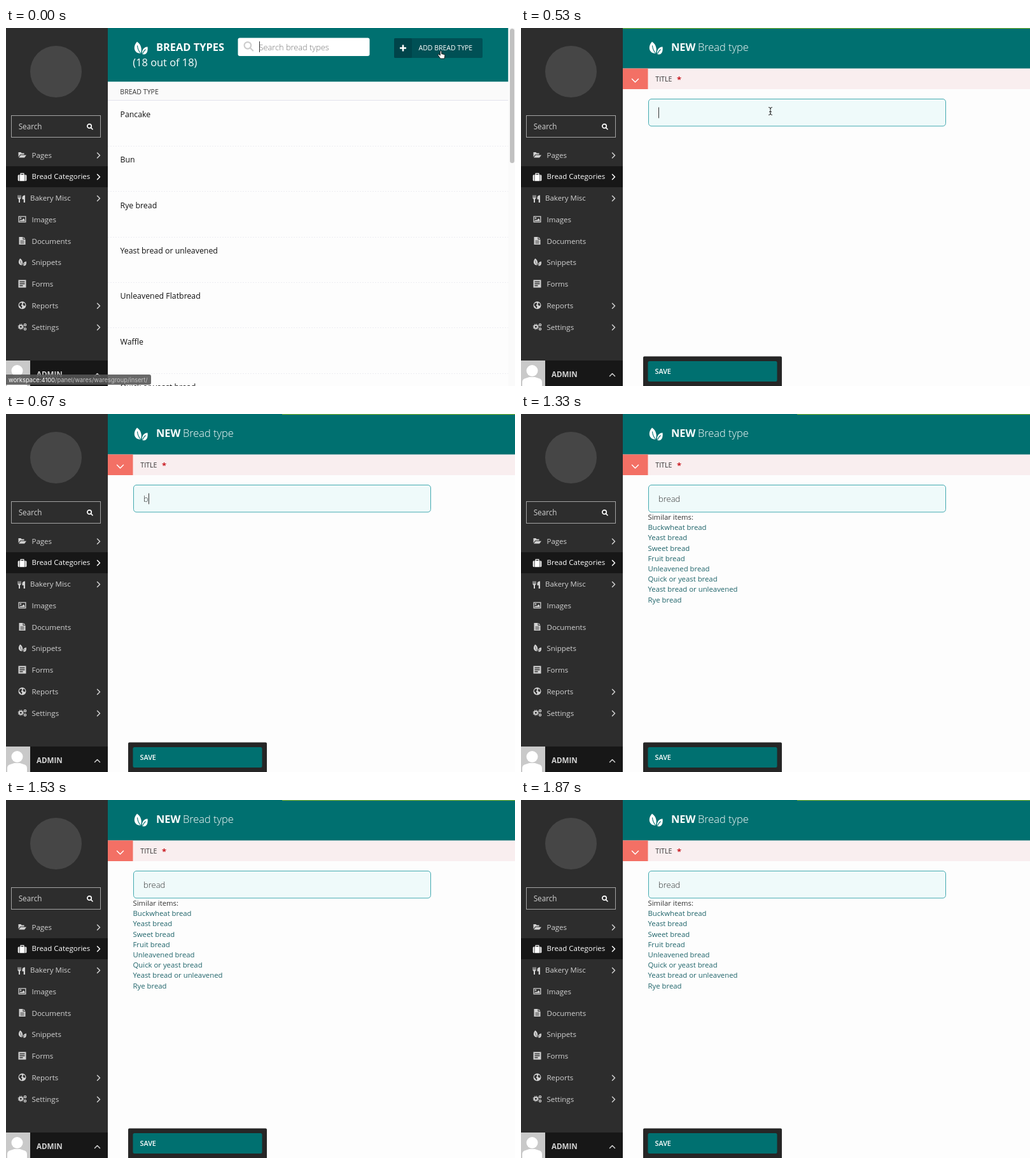
An HTML page that plays this animation: 800x562 px, repeating every 2.01 s.

```html
<!DOCTYPE html>
<html lang="en">
<head>
<meta charset="utf-8">
<title>Bread types</title>
<style>
html, body { margin: 0; width: 100%; height: 100%; overflow: hidden; background: #fdfdfd; }
svg { display: block; width: 800px; height: 562px; }
text { font-family: "Open Sans", sans-serif; white-space: pre; }
.light { font-weight: 300; }
.medium { font-weight: 500; }
.semi { font-weight: 600; }
.bold { font-weight: 700; }
.line { fill: none; stroke-width: 1.5; stroke-linecap: round; stroke-linejoin: round; }
.status { font-family: Inter, sans-serif; font-size: 9.4px; }
</style>
</head>
<body>
<svg viewBox="0 0 800 562">
  <defs>
    <g id="leaf">
      <path d="M4 0C0 4-2 11 2 15.500c2 2.500 5 3 8 2.500C12 11 10 4 4 0Z"/>
      <path d="M20.500 8c-6 .5-9.500 5-8.500 11.500 7 2 9.500-4 8.500-11.500Z"/>
      <path d="M4.500 6q.5 7 5 12M17.500 12q-3.500 3-5 7" fill="none" stroke="currentColor" stroke-width="1.100"/>
    </g>
    <g id="lens" fill="none" stroke="currentColor">
      <circle r="3.200" cx="-1" cy="-1"/><path d="M1.500 1.500 4 4" stroke-linecap="round"/>
    </g>
    <g id="Pages"><path d="M-6-4h4l1 1.500h4v2h-6l-3 4Z"/><path d="M-2.500.5h9l-3 4h-9Z"/></g>
    <g id="Bread"><path d="M-3-2v-3h6v3h-1.200v-1.800h-3.600V-2Z"/><path d="M-4-2.500h8v10h-8ZM-4.800-2.500v10q-2 0-2-1.500v-7q0-1.500 2-1.500ZM4.800-2.500v10q2 0 2-1.500v-7q0-1.500-2-1.500Z"/></g>
    <g id="Bakery"><path d="M-7-4h1v4h1v-4h1v4h1v-4h1v5l-1.500 1.500v5h-2v-5L-7 1ZM4.500-4v11.500h-2.300v-5H0V-1q1-3 4.500-3Z"/></g>
    <g id="Images"><path d="M-6-5H6V5H-6ZM-4.700-3.700v7.400h9.400v-7.400Z" fill-rule="evenodd"/><circle cx="-2.500" cy="-1.700" r="1.200"/><path d="M-4 3v-1l2-1.500 1.500 1 2.500-3 2 2.500v2Z"/></g>
    <g id="Documents"><path d="M-5-6H1v4h4v8H-5ZM2-6l3 3H2Z"/><path d="M-3 0h6M-3 2h6M-3 4h6" stroke="#2d2d2d" stroke-width=".8"/></g>
    <g id="Snippets"><use href="#leaf" transform="translate(-5.500 -6) scale(.58)" color="#2d2d2d"/></g>
    <g id="Forms"><path d="M-6-6H6V6H-6Z"/><path d="M-4-3h8M-4 0h8M-4 3h5" stroke="#2d2d2d" stroke-width="1.300"/></g>
    <g id="Reports"><circle r="6"/><path d="M-4-3l3-1 1 2-2 2 2 2-1 3-2-3-2-2ZM2-4l2 1 1 3-2 1-2-2Z" fill="#2d2d2d"/></g>
    <g id="Settings" fill="none" stroke="currentColor">
      <circle cx="-2.200" r="2.600" stroke-width="2"/><circle cx="-2.200" r="4.200" stroke-dasharray="1.700 1.600"/>
      <circle cx="4.500" cy="-3" r="1.600" stroke-width="1.400"/><circle cx="4.500" cy="3.500" r="1.600" stroke-width="1.400"/>
    </g>
  </defs>

  <rect width="800" height="562" fill="#fdfdfd"/>

  <g id="listing">
    <rect x="160" width="629.500" height="84.500" fill="#007070"/>
    <use href="#leaf" x="202" y="21.500" fill="#fff" color="#007070"/>
    <g fill="#fff" font-size="16.400">
      <text class="bold" x="236" y="36">BREAD TYPES</text>
      <text x="199.300" y="60.300">(18 out of 18)</text>
    </g>
    <rect x="364.500" y="15.500" width="207" height="28.500" rx="3" fill="#fff"/>
    <use href="#lens" transform="translate(381.500 29) scale(1.650)" color="#ccc" stroke-width="1.300"/>
    <text class="light" x="397.500" y="34.500" font-size="12.800" fill="#777">Search bread types</text>
    <path d="M398.500 21v17" stroke="#333"/>
    <rect x="610" y="16" width="139" height="31" rx="2" fill="#005055"/>
    <rect x="610" y="16" width="28" height="31" rx="2" fill="#00444a"/>
    <path d="M619 31.500h10M624 26.500v10" stroke="#fff" stroke-width="2.600"/>
    <text class="medium" x="648.500" y="35.200" font-size="10.500" fill="#fff">ADD BREAD TYPE</text>
    <rect x="160" y="84.500" width="629.500" height="29" fill="#fafafa"/>
    <path d="M160 113.500h629.500" stroke="#e3e3ec"/>
    <text x="179.300" y="103.500" font-size="10.600" fill="#333">BREAD TYPE</text>
    <g id="rows" font-size="12.350" fill="#111"></g>
    <rect x="789.500" width="10.500" height="562" fill="#fafafa"/>
    <rect x="792" y="1" width="7" height="211" rx="3.500" fill="#c1c1c1"/>
    <path d="M682.700 48l-3.700-5.500q-.3-1.800 1.600-1l1.700 1.500v-6q1.200-1.800 2.300 0v3.500l4.200 1q1.200.4 1 2l-.8 4.500Z" fill="#fff" stroke="#111" stroke-width=".9"/>
  </g>

  <g id="editor">
    <rect x="160" width="640" height="64" fill="#007070"/>
    <path id="edge" stroke="#7fb52a"/>
    <use href="#leaf" x="202" y="21.500" fill="#fff" color="#007070"/>
    <g fill="#fff" font-size="16.400">
      <text class="bold" x="236" y="36">NEW</text>
      <text class="light" x="278" y="36">Bread type</text>
    </g>
    <rect x="160" y="63.500" width="640" height="32.500" fill="#f9eeef"/>
    <rect x="160" y="63.500" width="39.500" height="32.500" fill="#f37065"/>
    <path class="line" d="M174.500 80l5 5 5-5" stroke="#fff"/>
    <text x="211.300" y="84.300" font-size="10.600" fill="#333">TITLE</text>
    <text class="bold" x="245" y="86" font-size="13" fill="#c9171e">*</text>
    <rect x="200.500" y="111.500" width="467" height="42.500" rx="4.500" fill="#effafa" stroke="#43a9b0"/>
    <text id="typed" class="light" x="216" y="138" font-size="13" fill="#333"></text>
    <path id="caret" d="M0 124.500v17" stroke="#333"/>
    <g id="similar" font-size="11.350"></g>
    <path id="beam" class="line" d="M389.500 124.500q2.500 0 2.500 2v8q0 2-2.500 2M394.500 124.500q-2.500 0-2.500 2M392 134.500q0 2 2.500 2M390.500 131.500h3" stroke="#222" style="stroke-width:1"/>
    <rect x="192" y="515.500" width="218" height="48" rx="2" fill="#262626"/>
    <rect x="199.500" y="523" width="203" height="32" rx="2.500" fill="#007070"/>
    <text class="semi" x="210.500" y="543.300" font-size="10.800" fill="#fff">SAVE</text>
  </g>

  <g id="sidebar">
    <rect width="160" height="562" fill="#2d2d2d"/>
    <circle cx="78.500" cy="68.500" r="40.500" fill="#464646"/>
    <rect x="8.500" y="137.500" width="140" height="34" fill="none" stroke="#a3a3a3"/>
    <text x="19.700" y="159" font-size="11.700" fill="#d2d2d2">Search</text>
    <use href="#lens" x="132" y="155" color="#fff" stroke-width="1.700"/>
    <rect y="217" width="160" height="33" fill="#171717"/>
    <g id="menu" font-size="11.500"></g>
    <rect y="522" width="160" height="40" fill="#171717"/>
    <rect y="522" width="38" height="40" fill="#c9c9c9"/>
    <g fill="#fff"><circle cx="17.500" cy="538" r="9"/><path d="M2 562v-6q0-5 5-6l6-2h9l6 2q5 1 5 6v6Z"/></g>
    <text class="bold" x="48" y="548" font-size="11.600" fill="#d2d2d2">ADMIN</text>
    <path class="line" d="M139.500 546.500l4-4 4 4" stroke="#d2d2d2"/>
  </g>

  <g id="status">
    <path d="M0 544h225q3 0 3 3v10q0 3-3 3H0Z" fill="#555" fill-opacity=".88"/>
    <text class="status" x="4" y="555.500" fill="#fff">workspace:4100<tspan fill="#c4c4c4">/panel/wares/waresgroup/insert/</tspan></text>
  </g>
</svg>
<script>
const LOOP = 2010;
const STEPS = [
  { at: 0, page: "listing" },
  { at: 330, text: "", caret: true, beam: true, edge: 160 },
  { at: 670, text: "b", caret: true, edge: 434 },
  { at: 1000, text: "brea", caret: true, edge: 434 },
  { at: 1330, text: "bread", similar: true, edge: 434 }
];
const MENU = ["Pages >", "Bread Categories >", "Bakery Misc >", "Images", "Documents",
  "Snippets", "Forms", "Reports >", "Settings >"];
const TYPES = ["Pancake", "Bun", "Rye bread", "Yeast bread or unleavened",
  "Unleavened Flatbread", "Waffle", "Quick or yeast bread"];
const SIMILAR = ["Similar items:", "Buckwheat bread", "Yeast bread", "Sweet bread", "Fruit bread",
  "Unleavened bread", "Quick or yeast bread", "Yeast bread or unleavened", "Rye bread"];

const el = id => document.getElementById(id);
const show = (id, on) => { el(id).style.display = on ? "" : "none"; };
const fill = (id, items, draw) => { el(id).innerHTML = items.map(draw).join(""); };

fill("menu", MENU, (item, i) => {
  const y = 199.5 + i * 33.75;
  const label = item.replace(" >", "");
  const color = i === 1 ? "#fff" : "#d2d2d2";
  const arrow = label === item ? "" :
    `<path class="line" d="M143.500 ${y - 3.5}l4 4-4 4" stroke="${color}"/>`;
  return `<use href="#${label.split(" ")[0]}" x="25.500" y="${y - 0.5}" fill="${color}" color="${color}"/>
    <text x="${i === 2 ? 38 : 40.5}" y="${y + 4}" fill="${color}">${label}</text>${arrow}`;
});

fill("rows", TYPES, (name, i) => {
  const y = 139.8 + i * 71.35;
  return `<text class="medium" x="179.500" y="${y}">${name}</text>
    <path d="M160 ${Math.round(y + 45) + 0.5}h629.500" stroke="#ededf2" stroke-dasharray="2 2"/>`;
});

fill("similar", SIMILAR, (name, i) =>
  `<text x="199.500" y="${166 + i * 16.2}" fill="${i ? "#1f646a" : "#333"}">${name}</text>`);

let current;
function render(step) {
  const listing = step.page === "listing";
  show("listing", listing);
  show("status", listing);
  show("editor", !listing);
  if (listing) return;
  el("typed").textContent = step.text;
  const end = 216.5 + (step.text ? el("typed").getComputedTextLength() : 0);
  el("caret").setAttribute("transform", `translate(${Math.floor(end) + 0.5})`);
  el("edge").setAttribute("d", `M${step.edge} .5H800`);
  for (const part of ["caret", "beam", "similar"]) show(part, step[part]);
}

function tick() {
  const time = performance.now() % LOOP;
  const step = STEPS.findLast(s => s.at <= time);
  if (step !== current) render(current = step);
  requestAnimationFrame(tick);
}
tick();
</script>
</body>
</html>
```
